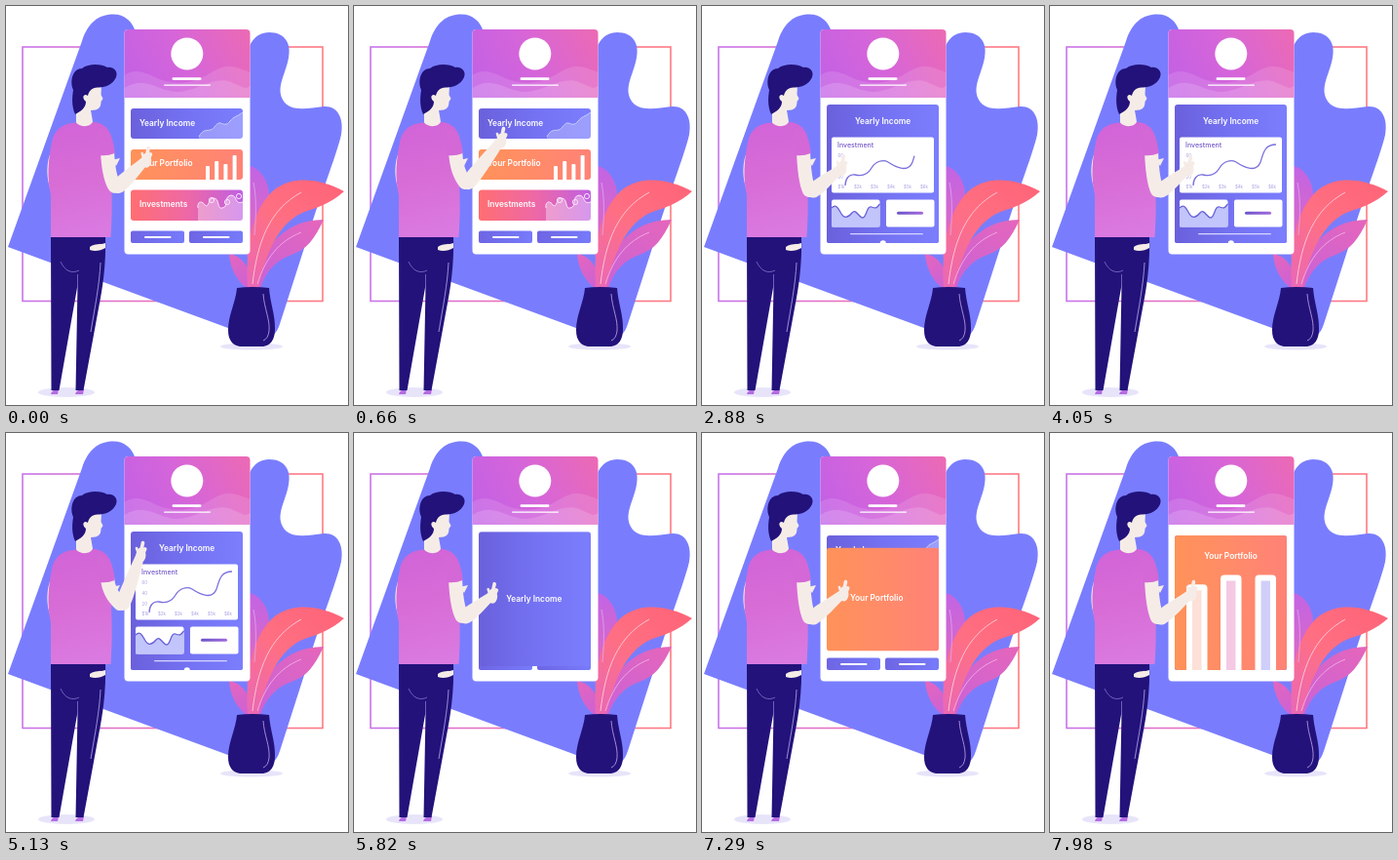
These frames come from a looping animation (351x409 px, 8 s). An HTML page with a canvas:

```html
<!DOCTYPE html>
<html lang="en">
<head>
<meta charset="utf-8">
<title>Portfolio app illustration</title>
<style>
html, body { margin: 0; width: 100%; height: 100%; overflow: hidden; background: #fff; }
canvas { display: block; width: 351px; height: 409px; }
</style>
</head>
<body>
<canvas id="stage"></canvas>
<script>
const W = 351, H = 409, LOOP = 8000;
const canvas = document.getElementById('stage');
const ctx = canvas.getContext('2d');
const dpr = window.devicePixelRatio || 1;
canvas.width = W * dpr;
canvas.height = H * dpr;

const SKIN = '#f6ece7', NAVY = '#22127a', BLUE = '#797dfd';
const FONT = 'Inter, "Open Sans", sans-serif';

const clamp = v => Math.max(0, Math.min(1, v));
const lerp = (a, b, p) => a + (b - a) * p;
const ease = u => u < .5 ? 4 * u ** 3 : 1 - 4 * (1 - u) ** 3;
const phase = (t, start, dur) => ease(clamp((t - start) / dur));

function gradient(x0, y0, x1, y1, ...colors) {
  const g = ctx.createLinearGradient(x0, y0, x1, y1);
  colors.forEach((c, i) => g.addColorStop(i / (colors.length - 1), c));
  return g;
}
function fill(d, color) {
  ctx.fillStyle = color;
  ctx.fill(new Path2D(d));
}
function line(d, color, width = 1) {
  ctx.strokeStyle = color;
  ctx.lineWidth = width;
  ctx.stroke(new Path2D(d));
}
function box(x, y, w, h, r, color) {
  ctx.beginPath();
  ctx.roundRect(x, y, w, h, r);
  ctx.fillStyle = color;
  ctx.fill();
}
function oval(x, y, rx, ry, color) {
  ctx.beginPath();
  ctx.ellipse(x, y, rx, ry, 0, 0, Math.PI * 2);
  ctx.fillStyle = color;
  ctx.fill();
}
function label(text, x, y, size, color, align = 'left', weight = 600) {
  ctx.font = `${weight} ${size}px ${FONT}`;
  ctx.textAlign = align;
  ctx.textBaseline = 'middle';
  ctx.fillStyle = color;
  ctx.fillText(text, x, y);
}

function backdrop() {
  ctx.strokeStyle = gradient(17, 0, 325, 0, '#c873ea', '#ef70b4', '#ff7a80');
  ctx.lineWidth = 1.6;
  ctx.strokeRect(17, 42, 308, 260.5);
  fill('M2 247 L78 36 C84 17 95 8.5 110 8.5 C122 8.5 130 16 133 27 L150 60 L240 70 ' +
       'C248 55 246 28 270 27 C286 27 293 38 290 53 C287 70 277 83 284 96 ' +
       'C291 109 309 105 326 103 C341 102 347 116 344 132 ' +
       'C339 154 321 198 308 242 L281 326 C277 339 268 344 255 340 Z', BLUE);
}

function plant() {
  oval(252, 349, 32, 3.6, '#e7e4fa');
  fill('M252 290 C246 258 244 205 249 164 C260 165 270 179 270 193 C270 225 260 255 258 290 Z',
       gradient(255, 164, 255, 290, '#c264e4', '#ef6cae'));
  fill('M248 290 C238 283 230 270 229 254 C241 256 251 266 254 290 Z',
       gradient(229, 253, 254, 290, '#e566bd', '#c961d8'));
  fill('M253 290 C260 252 283 219 326 219 C317 239 308 250 293 255 C278 260 266 272 261 290 Z',
       gradient(325, 219, 255, 290, '#e566bb', '#c962d8'));
  fill('M248 290 C245 244 254 205 277 187 C297 173 325 178 347 190 C333 202 322 206 309 210 ' +
       'C285 218 268 244 259 290 Z',
       gradient(347, 185, 249, 290, '#ff6478', '#ff6f83', '#e968b8'));
  line('M253 285 C258 242 270 209 303 191', '#ffc4cf', 1);
  line('M258 285 C266 259 280 241 303 232', '#f4b6ea', .8);
  line('M255 235 C257 215 257 195 254 181', '#e0a8f2', .8);
  fill('M237 289 Q253 287 270 289 C271 304 276.5 317 276 331 Q276 347 264 349 H240 ' +
       'Q228 347 228 332 C228 317 236 303 237 289 Z', NAVY);
  line('M264 295 C265 310 271 321 270 333 Q269 341 264 343', '#c7a9ef', .8);
}

function phoneShell() {
  box(121.5, 24, 129, 230.5, 4, '#fff');
  box(121.5, 24, 129, 70, [4, 4, 0, 0], gradient(122, 92, 250, 26, '#c160e6', '#d665d9', '#ec6ab4'));
  fill('M121.5 71 C137 61 148 73 164 77 S195 78 211 68 S235 62 250.5 68 V94 H121.5 Z', 'rgba(255,255,255,.12)');
  fill('M121.5 84 C143 70 157 88 176 88 S214 71 231 78 S244 85 250.5 82 V94 H121.5 Z', 'rgba(255,255,255,.15)');
  oval(185.8, 49, 16.5, 16.5, '#fff');
  box(170.5, 73.3, 30, 2.6, 1.3, '#fff');
  box(162, 80.4, 48, 1.3, .6, '#fff');
}

const yearlyColor = () => gradient(128, 0, 243, 0, '#6a60dc', '#7472f2', '#7b7efd');
const portfolioColor = () => gradient(128, 0, 243, 0, '#ff9259', '#ff8b69', '#ff8277');

function menu() {
  box(128, 105, 115, 31, 3, yearlyColor());
  const ridge = 'M198 134 C202 126 206 128 210 127 S216 119 220 120 S226 123 230 118 S236 114 243 109';
  fill(ridge + ' V136 H198 Z', 'rgba(255,255,255,.25)');
  line(ridge, '#c9ccff', 1);
  label('Yearly Income', 137, 120.5, 8.3, '#fff');

  box(128, 147, 115, 31, 3, portfolioColor());
  [164, 159, 162, 153].forEach((y, i) => box(205 + i * 9.2, y, 4, 178 - y, [1, 1, 0, 0], '#fff'));
  label('Your Portfolio', 137, 162, 8.3, '#fff');

  box(128, 188.5, 115, 31.5, 3, gradient(128, 0, 243, 0, '#ff6e72', '#ee68a5', '#bf60e3'));
  const crowd = 'M197 207 C196 199 202 200 204 204 C209 208 207 196 213 197 C220 197 216 209 222 207 ' +
                'C229 206 223 195 231 194 C238 194 234 204 243 201';
  fill(crowd + ' V220 H197 Z', 'rgba(255,255,255,.35)');
  line(crowd, '#fbe2fb', 1);
  [[211, 199], [227, 201], [239, 195]].forEach(([x, y]) => {
    ctx.beginPath();
    ctx.arc(x, y, 2.6, 0, Math.PI * 2);
    ctx.stroke();
  });
  label('Investments', 137, 203.5, 8.3, '#fff');

  for (const x of [128, 188]) {
    box(x, 230.5, 55, 12.5, 2, gradient(x, 0, x + 55, 0, '#6e65e4', '#777bfa'));
    box(x + 14, 236, 27.5, 2, 1, '#fff');
  }
}

// Clips to a card growing from its menu row to the full panel.
function openCard(p, y, h, top, color, content) {
  const cy = lerp(y, top, p), ch = lerp(h, 243 - top, p);
  ctx.save();
  ctx.beginPath();
  ctx.roundRect(128, cy, 115, ch, 3);
  ctx.clip();
  ctx.fillStyle = color;
  ctx.fillRect(128, cy, 115, ch);
  content();
  ctx.restore();
}

function chartSheet(y, drawn) {
  ctx.save();
  ctx.translate(0, y);
  box(133, 134.5, 105, 57, 2, '#fff');
  label('Investment', 139, 142.5, 7, '#7256c9', 'left', 500);
  ['60', '40', '20'].forEach((s, i) => label(s, 139.5, 154 + i * 11, 4.4, '#a99be0', 'left', 400));
  for (let i = 0; i < 6; i++) label(`$${i + 1}k`, 143 + i * 17, 185.5, 4.4, '#a99be0', 'center', 400);
  if (drawn > 0) {
    ctx.setLineDash([140 * drawn, 200]);
    line('M147 184 C147 177 151 172 157 173 C165 175 170 173 174 166 C178 159 186 157 191 160 ' +
         'C200 166 212 171 216 160 C219 151 220 142 232 142', '#7a70df', 1.3);
    ctx.setLineDash([]);
  }
  ctx.restore();
}

function smallCards(y) {
  ctx.save();
  ctx.translate(0, y);
  box(133, 198.5, 49.5, 28, 2, '#fff');
  const wave = 'M133 207 C138 202 140 208 143 213 S150 217 154 212 S161 217 165 217 S169 204 174 206 S179 207 182.5 203';
  fill(wave + ' V226.5 H133 Z', '#c2c5fb');
  line(wave, '#6861d9', 1.3);
  box(189, 198.5, 49.5, 28, 2, '#fff');
  box(200, 210.7, 27, 3, 1.5, gradient(200, 0, 227, 0, '#6a54cb', '#a269dc'));
  box(152, 233, 75, 1.2, .6, '#d7d5ff');
  ctx.restore();
}

function yearlyPanel(t) {
  const open = phase(t, 930, 520) - phase(t, 5720, 480);
  if (open <= 0) return;
  const close = phase(t, 5270, 500);
  const slide = start => lerp(108, 0, phase(t, start, 700) - close);
  const shift = slide(1450);
  openCard(open, 105, 31, 101, yearlyColor(), () => {
    const titleY = Math.min(172, 119 + shift);
    label('Yearly Income', lerp(165.5, 185.5, open), lerp(120.5, titleY, open), 8.3, '#fff', 'center');
    chartSheet(shift, phase(t, 2150, 1300));
    smallCards(slide(1600));
    if (open > .95) oval(185.8, 243, 3, 2.7, '#fff');
  });
}

function portfolioPanel(t) {
  const open = phase(t, 6990, 520);
  if (open <= 0) return;
  const rise = phase(t, 7515, 700);
  openCard(open, 147, 31, 105, portfolioColor(), () => {
    const titleY = lerp(172, 119, rise);
    label('Your Portfolio', lerp(164.5, 185.5, open), lerp(162, titleY, open), 8.3, '#fff', 'center');
    [[140, 93, '#fde0d7'], [175, 109, '#f4c9e4'], [210.5, 119, '#d0cffa']].forEach(([x, h, color], i) => {
      const y = 243 - h * phase(t, 7450 + i * 40, 700);
      box(x, y, 21.5, 243 - y, [4, 4, 0, 0], '#fff');
      box(x + 6, y + 6, 9.5, Math.max(0, 243 - y - 6), 0, color);
    });
  });
}

function man() {
  oval(62, 396, 29, 5, '#e7e4fa');
  fill('M46 398 Q47 393 54 393 L53 398 Z M71 398 Q72 393 80 393 L79 398 Z', '#b56be2');
  fill('M47 148 C41 158 41 178 46 188 L52 188 V148 Z', SKIN);
  fill('M46 235 H102 C103 265 99 290 95 310 L79.5 394 H71.5 L73.5 286 L54.5 394 H46.5 Z', NAVY);
  line('M56 262 C60 271 67 275 75 271 M73.5 275 V290', '#8277c8', .8);
  line('M97 263 C96 285 91 310 87 334', '#b9acec', .8);
  fill('M86 247 C91 243 97 245 102 243 V248 C97 251 91 252 86 250 Z', SKIN);

  fill('M108 158 L117 156 L113 164 Z', SKIN);
  fill('M73 119.5 C58 120 49 127 47 140 C43 160 42 176 46 194 L46 237 H107.5 C109 215 109 199 108 180 ' +
       'L111 151 C110 132 105 121 91 119 Z',
       gradient(60, 120, 88, 237, '#d264d8', '#d86dd6', '#da7be2'));
  fill('M72 98 L72 119.5 C77 125 87 124 89 118.5 L87 107 C95 107 97.5 104 97.5 98 L99.5 95 L97.5 91 L98 81 H79 Z', SKIN);
  fill('M71 111 C67 102 68 93 69 86 C65 76 69 64 78 64 C86 58 99 60 104 63 ' +
       'C110 62 115.5 67 113 73 C110 80 102 84 94 83.5 C88 84 85 87 84 92 C80 89 77 94 82 98 ' +
       'C82 104 77 108 71 111 Z', NAVY);
}

// time, fingertip x, y, elbow x, y
const armKeys = [
  [-120, 146, 146, 113, 186], [560, 154, 124, 116, 182], [740, 154, 124, 116, 182],
  [1350, 148, 152, 112, 190], [2300, 148, 152, 112, 190], [3200, 145, 153, 112, 190],
  [4450, 145, 153, 112, 190], [5050, 141, 111, 119, 176], [5220, 141, 111, 119, 176],
  [5950, 145, 157, 112, 190], [6400, 145, 157, 112, 190], [6660, 147, 154, 112, 190],
  [7200, 148, 151, 112, 190], [8001, 148, 151, 112, 190]
];
function armPose(t) {
  const i = armKeys.findIndex(k => k[0] > t);
  const a = armKeys[i - 1], b = armKeys[i];
  const u = (t - a[0]) / (b[0] - a[0]);
  const p = u * u * (3 - 2 * u);
  return a.slice(1).map((v, j) => lerp(v, b[j + 1], p));
}

function arm(t) {
  const [tx, ty, ex, ey] = armPose(t);
  const px = tx - 3, py = ty + 13;
  ctx.lineCap = ctx.lineJoin = 'round';
  line(`M104 148 Q105 ${ey - 12} ${ex - 2} ${ey - 1}`, SKIN, 14);

  const len = Math.hypot(px - ex, py - ey);
  ctx.save();
  ctx.translate(ex, ey);
  ctx.rotate(Math.atan2(py - ey, px - ex));
  fill(`M-4 -7 C9 -8 ${len - 14} -5 ${len} -4 L${len} 4.5 C${len - 12} 6 11 9.5 1 8 Q-9 5 -4 -7 Z`, SKIN);
  ctx.restore();

  oval(px + .5, py + 1, 5, 7.5, SKIN);
  line(`M${px} ${py} L${tx - .5} ${ty + 1.5}`, SKIN, 3.6);
  line(`M${px + 2} ${py} L${tx + 1.5} ${ty + 8}`, SKIN, 4);
  line(`M${px - 2} ${py} L${px - 4} ${py - 6}`, SKIN, 2.6);
  ctx.lineCap = 'butt';
  ctx.lineJoin = 'miter';
  fill('M93 126 C104 124 111 136 111.5 151 Q104 154 96 153 Z', '#d468d6');
}

function render(now) {
  const t = now % LOOP;
  ctx.setTransform(dpr, 0, 0, dpr, 0, 0);
  ctx.fillStyle = '#fff';
  ctx.fillRect(0, 0, W, H);
  backdrop();
  plant();
  phoneShell();
  menu();
  yearlyPanel(t);
  portfolioPanel(t);
  man();
  arm(t);
}

const start = performance.now();
function tick() {
  render(performance.now() - start);
  requestAnimationFrame(tick);
}
tick();
</script>
</body>
</html>
```
